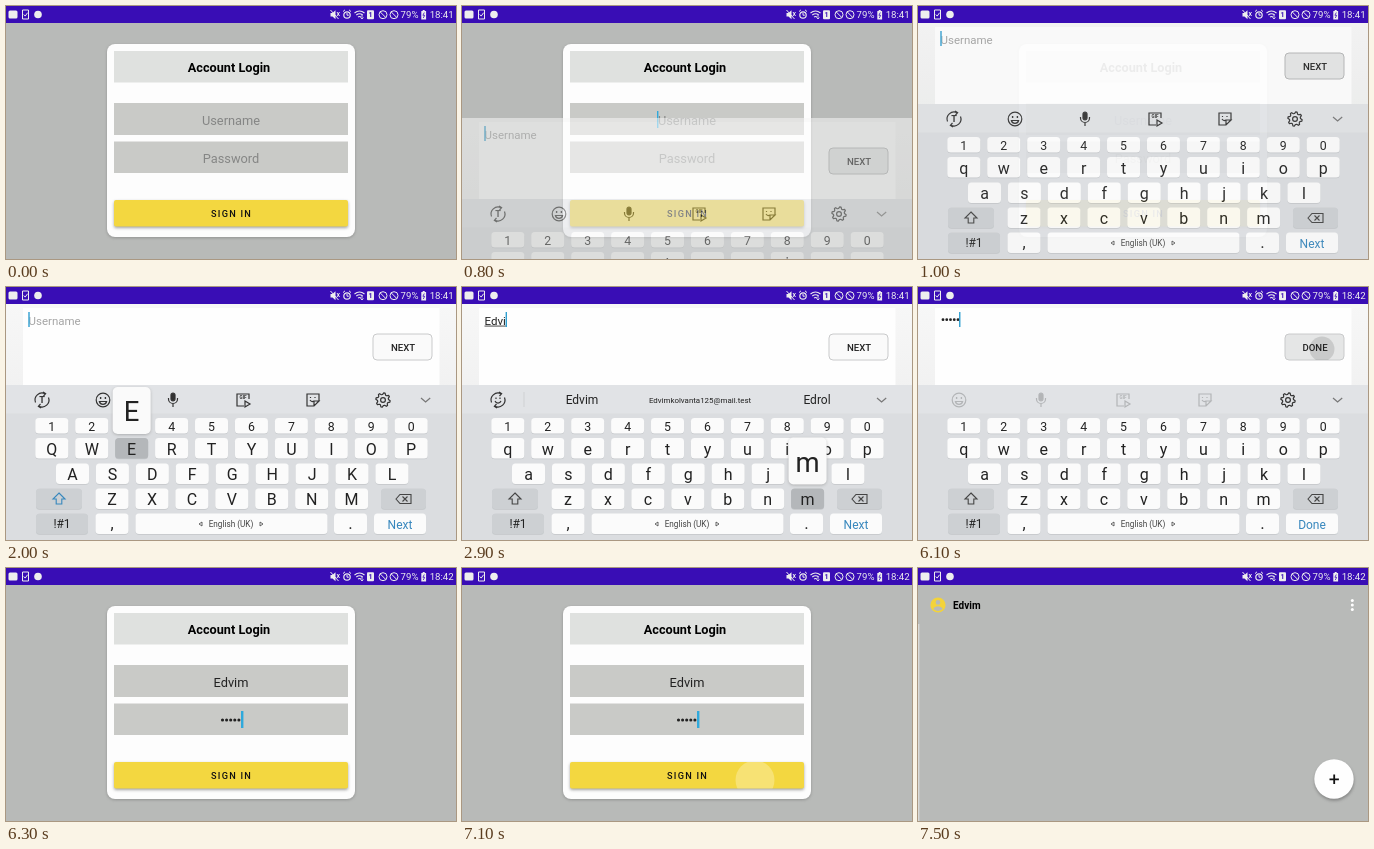
These frames come from a looping animation (450 px wide and 253 px high, 7.6 s). An HTML page:

```html
<!DOCTYPE html>
<html lang="en">
<head>
<meta charset="utf-8">
<title>Account login</title>
<style>
html, body { margin: 0; width: 100%; height: 100%; overflow: hidden; background: #b8bab8; }
svg { display: block; width: 450px; height: 253px; font-family: Roboto, sans-serif; }
</style>
</head>
<body>
<script>
const LOOP = 7600, TICK = 100;
const NS = 'http://www.w3.org/2000/svg';
const NAME = 'Edvim', EMAIL = 'Edvimkolvanta125@mail.test';

function el(parent, tag, attrs = {}) {
  const node = document.createElementNS(NS, tag);
  set(node, attrs);
  parent.append(node);
  return node;
}
function set(node, attrs) {
  for (const k in attrs) node.setAttribute(k, attrs[k]);
}
const group = (parent, attrs) => el(parent, 'g', attrs);
const box = (parent, x, y, w, h, fill, rx = 0, more = {}) =>
  el(parent, 'rect', { x, y, width: w, height: h, fill, rx, ...more });
const disc = (parent, cx, cy, r, fill, more = {}) => el(parent, 'circle', { cx, cy, r, fill, ...more });
const line = (parent, d, stroke, width = 1, more = {}) =>
  el(parent, 'path', { d, stroke, 'stroke-width': width, fill: 'none', ...more });
// y is the middle of the capitals
function label(parent, x, y, str, size, fill = '#222', more = {}) {
  const node = el(parent, 'text', {
    x, y: y + size * .36, 'font-size': size, fill, 'text-anchor': 'middle', ...more });
  node.textContent = str;
  return node;
}
const show = (node, on) => node.setAttribute('visibility', on ? 'inherit' : 'hidden');
// value of the last [time, value] step reached
function at(steps, t) {
  let value = steps[0][1];
  for (const [time, v] of steps) if (t >= time) value = v;
  return value;
}

const svg = el(document.body, 'svg', { viewBox: '0 0 450 253' });
const defs = el(svg, 'defs');
defs.innerHTML = `
  <clipPath id="signClip"><rect x="108" y="194" width="234" height="26.5" rx="2"/></clipPath>
  <clipPath id="actionClip"><rect x="367" y="47" width="59" height="26" rx="4"/></clipPath>
  <linearGradient id="side" x2="0" y2="1"><stop stop-color="#f7f7f7"/><stop offset="1" stop-color="#dedfdf"/></linearGradient>
  <filter id="soft" x="-30%" y="-30%" width="160%" height="160%"><feGaussianBlur stdDeviation="1.5"/></filter>`;

// Login card
const login = group(svg);
box(login, 0, 0, 450, 253, '#b8bab8');
box(login, 101, 39, 248, 193, '#777', 8, { filter: 'url(#soft)', opacity: .6 });
box(login, 101, 38, 248, 193, '#fdfdfd', 8);
box(login, 108, 45, 234, 31.5, '#dfe1df');
label(login, 223, 61.3, 'Account Login', 12.7, '#000', { 'font-weight': 700 });
box(login, 108, 97, 234, 32, '#c9cac7');
box(login, 108, 135.5, 234, 31.5, '#c9cac7');
const userField = label(login, 225, 114, '', 12.8);
const passHint = label(login, 225, 152, 'Password', 12.8, '#858685');
const passDots = group(login);
for (let i = 0; i < 5; i++) disc(passDots, 216.5 + i * 4.1, 152, 1.55, '#222');
const cardCursor = box(login, 0, 0, 1.6, 17, '#2fa9dc');
box(login, 108, 195.5, 234, 26.5, '#666', 2, { filter: 'url(#soft)', opacity: .6 });
box(login, 108, 194, 234, 26.5, '#f3d740', 2);
const signRipple = disc(login, 293, 212, 0, '#fff', { opacity: .27, 'clip-path': 'url(#signClip)' });
label(login, 225.6, 207.3, 'SIGN IN', 9.2, '#111', { 'font-weight': 500, 'letter-spacing': 1.25 });

// Full-screen text entry and keyboard
const entry = group(svg);
box(entry, 0, 17, 450, 360, 'url(#side)');
box(entry, 0, 17, 450, 4, '#f7f7f7');
box(entry, 17, 21, 416.5, 78, '#fefefe');
const entryText = label(entry, 22.5, 33.5, '', 11.5, '#222', { 'text-anchor': 'start' });
const underline = box(entry, 22.5, 38.6, 0, .9, '#333');
const entryDots = group(entry);
for (let i = 0; i < 5; i++) disc(entryDots, 25 + i * 3.75, 32.7, 1.4, '#222');
const entryCursor = box(entry, 22, 25, 1.4, 15, '#2f9fd0');
const actionBox = box(entry, 367, 47, 59, 26, '#fafafa', 4, { stroke: '#c9cacb' });
const actionRipple = disc(entry, 404, 62, 12.5, '#000', { opacity: .12, 'clip-path': 'url(#actionClip)' });
const actionText = label(entry, 397, 60.2, 'NEXT', 9.6, '#222', { 'font-weight': 500 });

const board = group(entry);
box(board, 0, 98, 450, 155, '#dbdde0');
box(board, 0, 98, 450, 28.5, '#e1e3e6');
line(board, 'M415 111l4.6 4 4.6-4', '#777', 1.2);

const icon = (parent, x, color = '#333') => group(parent, {
  transform: `translate(${x} 113)`, stroke: color, fill: 'none', 'stroke-width': 1.2 });
const icons = {
  smile(g) {
    disc(g, 0, 0, 6.8, 'none');
    el(g, 'path', { d: 'M-3.6 1.5a3.7 3.7 0 0 0 7.2 0z' });
    for (const x of [-2.4, 2.4]) line(g, `M${x}-3v2`, 'inherit', 1.4).removeAttribute('stroke');
  },
  mic(g) {
    el(g, 'path', { d: 'M-2-5a2 2 0 0 1 4 0v4a2 2 0 0 1-4 0z', fill: g.getAttribute('stroke') });
    el(g, 'path', { d: 'M-4.5-2v1a4.5 4.5 0 0 0 9 0v-1M0 3.5V7' });
  },
  gif(g) {
    el(g, 'path', { d: 'M6-1v-5H-6V6H1' });
    el(g, 'path', { d: 'M2 1l5 3-5 3z' });
    const t = label(g, 0, -2.5, 'GIF', 4.6, g.getAttribute('stroke'));
    set(t, { stroke: 'none', 'font-weight': 700 });
  },
  sticker(g) {
    el(g, 'path', { d: 'M6 1v-7H-6V6H1L6 1H1V6M-3 0a3 3 0 0 0 4 1M-2.5-3v1M2-3v1' });
  },
  gear(g) {
    const teeth = Array.from({ length: 32 }, (_, i) => {
      const a = i * Math.PI / 16 + .1, r = i % 4 < 2 ? 7.2 : 5.5;
      return `${(r * Math.cos(a)).toFixed(2)},${(r * Math.sin(a)).toFixed(2)}`;
    });
    el(g, 'polygon', { points: teeth.join(' '), 'stroke-linejoin': 'round' });
    disc(g, 0, 0, 2.4, 'none');
  },
  turn(g) {
    el(g, 'path', { d: 'M-6.5 2.5A7 7 0 0 1 3-6.3M6.5-2.5A7 7 0 0 1-3 6.3M1-8l2.6 1.7L1.5-4M-1 8l-2.6-1.7L-1.5 4' });
  }
};
const put = (parent, kind, x, color) => {
  const g = icon(parent, x, color);
  icons[kind](g);
  return g;
};

const tools = group(board);
const textTool = put(tools, 'turn', 36);
label(textTool, 0, 0, 'T', 9, '#333', { 'font-weight': 700, stroke: 'none' });
['smile', 'mic', 'gif', 'sticker', 'gear'].forEach((k, i) => put(tools, k, 97 + i * 70));

const hints = group(board);
const faceTool = put(hints, 'turn', 36);
el(faceTool, 'path', { d: 'M-3 1a3.2 3.2 0 0 0 6 0M-2-2.5v1.4M2-2.5v1.4' });
line(hints, 'M62 105v15', '#cfd1d3');
const hintTexts = [[120, 12], [238, 7.9], [355, 12]].map(([x, size]) => label(hints, x, 112.8, '', size));

const secretTools = group(board);
['smile', 'mic', 'gif', 'sticker'].forEach((k, i) => put(secretTools, k, 41 + i * 82, '#b3b5b7'));
put(secretTools, 'gear', 370);

const keys = {};
const PITCH = 39.93, LIGHT = '#fbfbfb', DARK = '#cdd0d3';
function key(id, cx, y, w, h, fill = LIGHT) {
  box(board, cx - w / 2, y + .8, w, h, '#c3c6c9', 3.5);
  return keys[id] = { cx, y, fill, face: box(board, cx - w / 2, y, w, h, fill, 3.5) };
}
[['1234567890', 45.8, 131, 15.5, 12.3], ['qwertyuiop', 45.8, 151, 20.5, 16],
 ['asdfghjkl', 66.5, 176.5, 20.5, 16], ['zxcvbnm', 106, 201.5, 20.5, 16]]
  .forEach(([chars, x, y, h, size]) => [...chars].forEach((c, i) => {
    const k = key(c, x + i * PITCH, y, 33, h);
    k.text = label(board, k.cx, y + h / 2 + .5, c, size);
  }));
key('shift', 53, 201.5, 46, 20.5, DARK);
const shiftIcon = line(board, 'M53 206l6 6h-3.2v5h-5.6v-5H47z', '#444', 1.1);
key('back', 397.5, 201.5, 45, 20.5, DARK);
line(board, 'M390 212l4-4.5h11v9h-11zM396.5 209.5l5 5m0-5l-5 5', '#444', 1.1);
key('sym', 56, 226.5, 52, 20.5, DARK);
label(board, 56, 237, '!#1', 12);
key('comma', 106, 226.5, 33, 20.5);
label(board, 106, 236, ',', 16);
key('space', 225.5, 226.5, 192, 20.5);
label(board, 225, 237, 'English (UK)', 8.2, '#444');
line(board, 'M196 235l-3 2 3 2zM254 235l3 2-3 2z', '#444', .8);
key('dot', 344.5, 226.5, 33, 20.5);
label(board, 344.5, 236, '.', 17);
key('next', 394, 226.5, 52, 20.5);
const nextText = label(board, 394, 237.2, 'Next', 12, '#3787bd');

const popup = group(board);
box(popup, -19, 1, 38, 47, '#888', 5, { filter: 'url(#soft)', opacity: .5 });
box(popup, -19, 0, 38, 47, '#fafafa', 5);
const popupText = label(popup, 0, 24.5, '', 27.5);

// Home screen
const home = group(svg);
box(home, 0, 0, 450, 253, '#b8bab8');
box(home, 0, 56, 1.4, 197, '#d9dad8');
disc(home, 20, 37, 7.6, '#f3d33a');
disc(home, 20, 34.4, 2.3, '#b8bab8');
el(home, 'path', { d: 'M15.2 40.4q4.8-4.2 9.6 0a5.7 5.7 0 0 1-9.6 0z', fill: '#b8bab8' });
label(home, 35, 37.3, NAME, 10, '#000', { 'font-weight': 700, 'text-anchor': 'start' });
for (const y of [32.5, 37, 41.5]) disc(home, 434.3, y, 1.5, '#fff');
disc(home, 416.3, 213, 19.8, '#555', { filter: 'url(#soft)', opacity: .5 });
disc(home, 416, 211, 19.7, '#fefefe');
line(home, 'M411.5 211.3h9.4M416.2 206.6v9.4', '#111', 1.8);

// Status bar
const bar = group(svg);
box(bar, 0, 0, 450, 17, '#390db5');
box(bar, 2.5, 4.5, 9, 8, '#eee', 1.5);
line(bar, 'M16.5 4h6v9h-6zM17.8 8.5l1.4 1.6 2.4-3.4', '#eee');
disc(bar, 32, 8.5, 3.8, '#eee');
el(bar, 'path', { d: 'M324.5 7h2l3-2.8v9l-3-2.8h-2z', fill: '#eee' });
line(bar, 'M324.5 4l8 9M331 6l2.5 4m0-4L331 10', '#eee');
disc(bar, 341, 9, 3.2, 'none', { stroke: '#eee', 'stroke-width': 1.2 });
line(bar, 'M341 7v2.2h1.8M337 5.6l2-1.8M345 5.6l-2-1.8', '#eee');
line(bar, 'M348.5 7q5-4 10 0M350.3 9q3.2-2.6 6.4 0M352 11q1.5-1 3 0', '#eee', 1.1);
line(bar, 'M356 9v4m-1.5-1.5L356 13l1.5-1.5', '#eee', .8);
box(bar, 361, 4.3, 7, 9, '#eee', 1);
label(bar, 364.5, 8.9, '1', 7, '#390db5', { 'font-weight': 700 });
for (const x of [377, 388]) {
  disc(bar, x, 8.7, 4, 'none', { stroke: '#eee' });
  line(bar, `M${x - 2.8} 5.9l5.6 5.6`, '#eee');
}
label(bar, 403.5, 9, '79%', 9.6, '#eee');
el(bar, 'path', { d: 'M415.3 5h1.4v-1h2v1h1.4v8.5h-4.8z', fill: '#eee' });
line(bar, 'M418.3 6.5l-1.4 2.8h1.8l-1.4 2.7', '#390db5', .8);
const clock = label(bar, 435.7, 9, '', 9.7, '#eee');

// Step tables: [time, value]
const typed = [[0, 0], [2100, 1], [2300, 2], [2500, 3], [2700, 4], [3000, 5]];
const secret = [[0, 0], [4400, 1], [4700, 2], [4900, 3], [5200, 4], [5600, 5]];
const pressed = [[0, ''], [1500, 'shift'], [1600, ''], [2000, 'e'], [2100, ''], [2200, 'd'], [2300, ''],
  [2400, 'v'], [2500, ''], [2900, 'm'], [3000, ''], [3500, 'next'], [3600, ''],
  [4300, 'a'], [4400, ''], [5500, 'm'], [5600, '']];
const suggestions = [[0, ['Edvim', 'Every', 'Each']], [2300, ['Ed', 'Edvim', 'Edit']],
  [2700, [NAME, EMAIL, 'Edrol']], [3200, [NAME, EMAIL, 'Edvimkolvanta']]];
const entryShown = [[0, 0], [800, .55], [900, .85], [1000, .93], [1200, .97], [1400, 1], [6200, .5], [6300, 0]];
const entryDrop = [[0, 0], [800, 95], [900, 25], [1000, 0], [6200, 95]];
const homeShown = [[0, 0], [7300, .45], [7400, .85], [7500, 1]];
const homeDrop = [[0, 0], [7300, 22], [7400, 6], [7500, 0]];
const ripple = [[0, 0], [7000, 11], [7100, 19.5], [7200, 45], [7300, 100]];
const cursorOn = [[0, 1], [1500, 0], [1800, 1], [3500, 0], [3800, 1]];
const cardCursorOn = [[0, 0], [700, 1], [1000, 0], [6200, 1], [6600, 0], [7000, 1]];

function drawEntry(t) {
  const onPassword = t >= 3800, count = at(typed, t), dots = at(secret, t), down = at(pressed, t);
  const caps = t >= 1600 && t < 2100;
  set(entry, { opacity: at(entryShown, t), transform: `translate(0 ${at(entryDrop, t)})` });

  const empty = onPassword ? !dots : !count;
  entryText.textContent = empty ? (onPassword ? 'Password' : 'Username') : onPassword ? '' : NAME.slice(0, count);
  set(entryText, { fill: empty ? '#a5a5a5' : '#222' });
  const width = empty ? 0 : onPassword ? dots * 3.75 : entryText.getComputedTextLength();
  set(underline, { width: onPassword || t >= 3500 ? 0 : width });
  [...entryDots.children].forEach((d, i) => show(d, onPassword && i < dots));
  set(entryCursor, { x: 22.3 + width });
  show(entryCursor, at(cursorOn, t));

  const lit = t < 1500 || t >= 6100;
  set(actionBox, { fill: lit ? '#e5e6e6' : '#fafafa', stroke: t < 1500 ? '#b5b6b7' : '#c9cacb' });
  actionText.textContent = onPassword ? 'DONE' : 'NEXT';
  nextText.textContent = onPassword ? 'Done' : 'Next';
  show(actionRipple, t >= 6100);

  show(tools, t < 2100);
  show(hints, t >= 2100 && !onPassword);
  show(secretTools, onPassword);
  at(suggestions, t).forEach((s, i) => { hintTexts[i].textContent = s; });

  for (const id in keys) {
    const k = keys[id];
    set(k.face, { fill: id === down ? '#b4b7ba' : k.fill });
    if (k.text) k.text.textContent = caps ? id.toUpperCase() : id;
  }
  set(shiftIcon, { stroke: caps ? '#3787bd' : '#444' });
  const raised = !onPassword && down.length === 1;
  show(popup, raised);
  if (raised) {
    set(popup, { transform: `translate(${keys[down].cx} ${keys[down].y - 51})` });
    popupText.textContent = caps ? down.toUpperCase() : down;
  }
}

function draw(t) {
  const filled = t >= 6200;
  clock.textContent = t < 4300 ? '18:41' : '18:42';
  userField.textContent = filled ? NAME : 'Username';
  set(userField, { fill: filled ? '#222' : '#858685' });
  show(passHint, !filled);
  show(passDots, filled);
  set(cardCursor, filled ? { x: 235, y: 143, width: 2.4 } : { x: 195, y: 105, width: 1.4 });
  show(cardCursor, at(cardCursorOn, t));
  set(signRipple, { r: at(ripple, t) });

  const entryVisible = at(entryShown, t) > 0;
  show(entry, entryVisible);
  if (entryVisible) drawEntry(t);

  show(home, at(homeShown, t) > 0);
  set(home, { opacity: at(homeShown, t), transform: `translate(0 ${at(homeDrop, t)})` });
}

const start = performance.now();
function frame() {
  const t = (performance.now() - start) % LOOP;
  draw(Math.floor(t / TICK) * TICK);
  requestAnimationFrame(frame);
}
frame();
</script>
</body>
</html>
```
